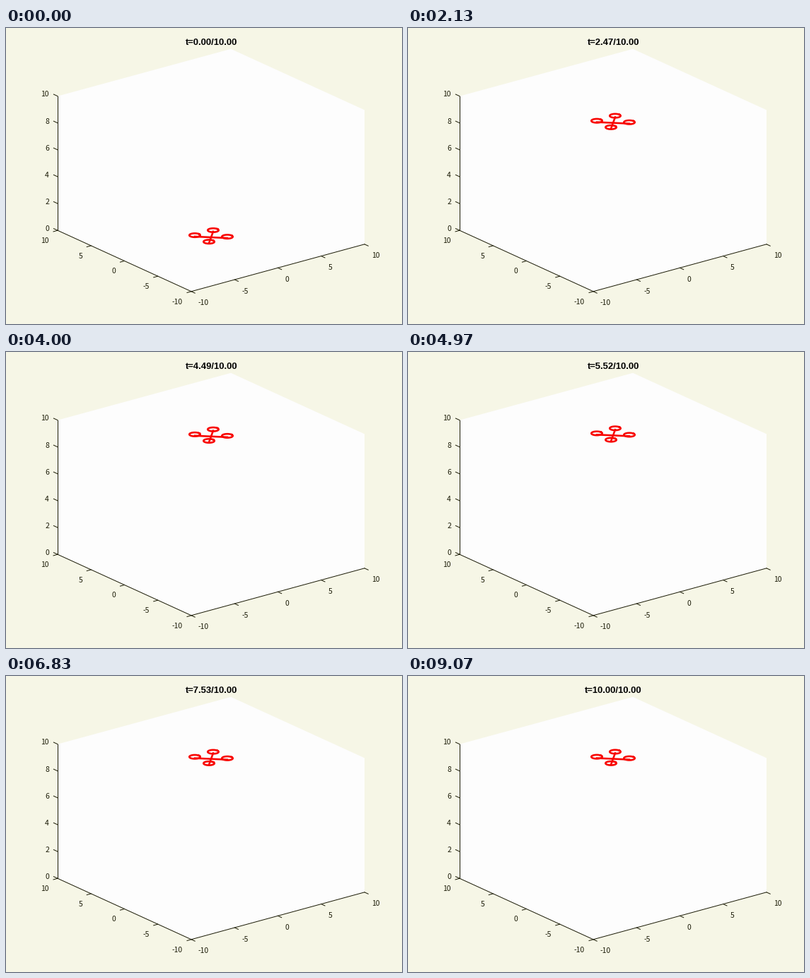
Animation, 560 px wide and 420 px high, one loop 9.11 s. Source, as a matplotlib script:

```python
import numpy as np
import matplotlib.pyplot as plt
from matplotlib.animation import FuncAnimation

W, H, DPI = 560, 420, 100
FRAMES, LOOP = 273, 9110
PX = 72 / DPI                       # one pixel in points
INK = "#1c1c08"
RED = "#f80400"

# Orthographic view: screen position of the floor centre and of one unit per axis
ORIGIN = np.array([290, 297])
VIEW = np.array([[12.25, -3.35], [-9.45, -4.33], [0, -19.05]])

GOAL = 9.42                         # height the craft settles at
ARM, ROTOR, LIFT = 1.5, 0.5, 0.1


def project(x, y, z):
    pts = np.stack(np.broadcast_arrays(x, y, z), -1).astype(float)
    return ORIGIN + pts @ VIEW


def clock(i):
    return np.interp(i, [0, 36, 63, 93, 148, 204, 271],
                     [0, 1.52, 2.47, 3.57, 5.52, 7.53, 10])


def height(t):
    # overdamped step response with poles at -1 and -9
    return GOAL * (1 - (9 * np.exp(-t) - np.exp(-9 * t)) / 8)


fig = plt.figure(figsize=(W / DPI, H / DPI), dpi=DPI, facecolor="#f6f6e6")
ax = fig.add_axes([0, 0, 1, 1])
ax.set_xlim(0, W)
ax.set_ylim(H, 0)
ax.axis("off")


def line(pts, color=INK, width=1.0, **kw):
    pts = np.asarray(pts)
    return ax.plot(pts[:, 0], pts[:, 1], color=color, lw=width * PX, **kw)[0]


def label(x, y, s, ha):
    ax.text(x, y, s, ha=ha, va="center_baseline", color=INK,
            family="Noto Sans CJK JP", fontsize=10.4 * PX)


def tick(p, d):
    line([p, p + np.array(d)], snap=False)


# Visible walls of the box
outline = project([-10, -10, 10, 10, 10, -10],
                  [10, 10, 10, -10, -10, -10],
                  [0, 10, 10, 10, 0, 0])
ax.fill(outline[:, 0], outline[:, 1], color="#fdfdfd", lw=0)

line(project([-10, -10], [10, 10], [0, 10]))
line(project([-10, -10, 10], [10, -10, -10], 0))

for v in range(-10, 11, 5):
    p = project(v, -10, 0)
    tick(p, (5.2, 2.4))
    label(p[0] + 10, p[1] + 15.6, str(v), "left")
    p = project(-10, v, 0)
    tick(p, (-6, 1.7))
    label(p[0] - 12, p[1] + 14, str(v), "right")
for v in range(0, 11, 2):
    p = project(-10, 10, v)
    tick(p, (-5.6, -2.6))
    label(p[0] - 12, p[1] - 3.3, str(v), "right")

title = ax.text(290.5, 20, "", ha="center", va="center_baseline",
                color="black", family="Liberation Sans", weight="bold",
                fontsize=13 * PX)

# Quadcopter: two crossed arms and a rotor ring above each tip
turn = np.linspace(0, 2 * np.pi, 49)
shapes = []
for a in (np.pi / 4, 3 * np.pi / 4):
    tips = np.array([-ARM, ARM])
    shapes.append(project(tips * np.cos(a), tips * np.sin(a), 0))
for a in np.pi / 4 + np.arange(4) * np.pi / 2:
    shapes.append(project(ARM * np.cos(a) + ROTOR * np.cos(turn),
                          ARM * np.sin(a) + ROTOR * np.sin(turn), LIFT))
parts = [line(s, RED, 2.6) for s in shapes]


def draw(i):
    t = clock(i)
    rise = height(t) * VIEW[2, 1]
    for part, s in zip(parts, shapes):
        part.set_ydata(s[:, 1] + rise)
    title.set_text(f"t={t:.2f}/10.00")
    return [*parts, title]


anim = FuncAnimation(fig, draw, frames=FRAMES, interval=LOOP / FRAMES,
                     repeat=True, repeat_delay=0)
plt.show()
```
